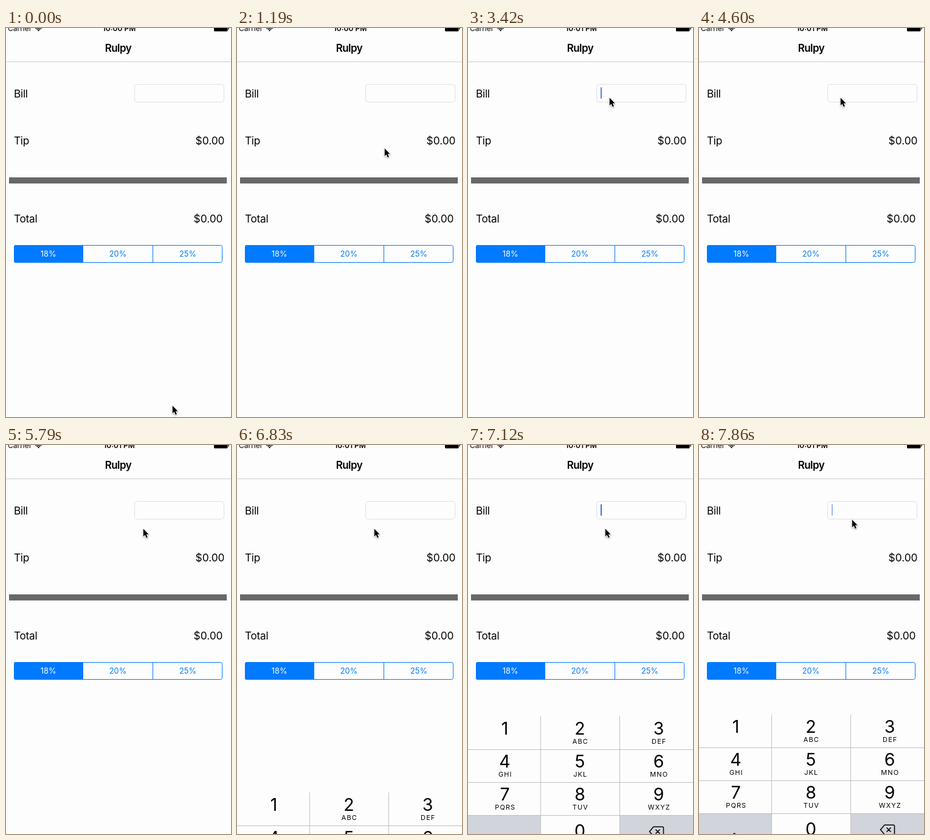
Write an HTML page that moves like this. It is 370x638 px and loops after 8 s.

```html
<!DOCTYPE html>
<html lang="en">
<head>
<meta charset="utf-8">
<title>Tip calculator</title>
<style>
  html, body { margin: 0; width: 100%; height: 100%; overflow: hidden; background: #fdfdfd; }
  svg { display: block; width: 370px; height: 638px; }
  text { font: 17.3px Inter, Roboto, sans-serif; }
  .mid { text-anchor: middle; }
  .label { letter-spacing: -.3px; }
  .amount { text-anchor: end; }
  .title { font-size: 17px; font-weight: 600; letter-spacing: -.5px; }
  .status { font-size: 12px; }
  .clock { font-weight: 600; }
  .seg { font-size: 12.8px; fill: #007aff; }
  .digit { font-size: 28.5px; }
  .letters { font-size: 11px; letter-spacing: 1.1px; }
  .grid { stroke: #c0c0c0; }
  .line { fill: none; stroke: #000; stroke-width: 1.5; }
</style>
</head>
<body>
<svg viewBox="0 0 370 638">
  <rect width="370" height="638" fill="#fdfdfd"/>

  <text class="status" x="3" y="5">Carrier</text>
  <path d="M48.5 1Q53.5 -3 58.5 1M50.5 2.5Q53.5 .2 56.5 2.5" class="line"/>
  <path d="M51.6 3.6Q53.5 2.3 55.4 3.6L53.5 5.6z"/>
  <text id="clock" class="status clock mid" x="186" y="5"></text>
  <rect x="342" y="-5" width="22.5" height="10.6" rx="1.5"/>
  <path d="M365.3 -1q1.5 .3 1.5 2t-1.5 2z"/>

  <text class="title mid" x="184.5" y="39">Rulpy</text>
  <path d="M0 55.5H370" stroke="#cfcfcf"/>

  <text class="label" x="13" y="114">Bill</text>
  <rect x="211.5" y="92.5" width="147" height="29" rx="4" fill="none" stroke="#e0e0e0"/>
  <rect id="caret" x="218" y="97" width="2" height="19" rx="1" fill="#426bf2"/>
  <text class="label" x="13" y="191">Tip</text>
  <text class="amount" x="359.5" y="191">$0.00</text>
  <rect x="5" y="245" width="358" height="10" fill="#686868"/>
  <text class="label" x="13" y="319">Total</text>
  <text class="amount" x="356.5" y="319">$0.00</text>

  <path d="M127 356H16a3 3 0 0 0 -3 3V382a3 3 0 0 0 3 3H127z" fill="#007aff"/>
  <rect x="13.5" y="356.5" width="342" height="28" rx="3" fill="none" stroke="#007aff"/>
  <path d="M241.5 356V385" stroke="#007aff"/>
  <text class="seg mid" x="69.7" y="375" style="fill:#fff">18%</text>
  <text class="seg mid" x="184" y="375">20%</text>
  <text class="seg mid" x="299" y="375">25%</text>

  <g id="pad">
    <rect width="370" height="216" fill="#fdfdfd"/>
    <path d="M0 162H119V216H0zM250 162H370V216H250z" fill="#d1d4db"/>
    <path class="grid" d="M0 54.5H370M0 108.5H370M0 162.5H370M119.5 0V216M249.5 0V216"/>
    <g id="keys"></g>
    <path class="line" d="M298.5 189L305 181.3H319.5Q321.5 181.3 321.5 183.3V194.7Q321.5 196.7 319.5 196.7H305zM308.5 185.5l7 7m0 -7l-7 7"/>
  </g>

  <path id="cursor" d="M0 0V12.6L2.8 10L5 14.8L7.1 13.8L5 9.1H8.8z" stroke="#fff" stroke-width="1.8"
    stroke-linejoin="round" paint-order="stroke" style="filter:drop-shadow(0 1px 1px #0005)"/>
</svg>
<script>
const $ = id => document.getElementById(id);
const LOOP = 8000, STEP = LOOP / 54;

const letters = ['', 'ABC', 'DEF', 'GHI', 'JKL', 'MNO', 'PQRS', 'TUV', 'WXYZ'];
const label = (kind, x, y, s) => `<text class="${kind} mid" x="${x}" y="${y}">${s}</text>`;
$('keys').innerHTML = letters.map((s, i) => {
  const x = [60.5, 184, 313.5][i % 3], y = 54 * Math.floor(i / 3);
  return label('digit', x, y + 30, i + 1) + label('letters', x + .8, y + 45, s);
}).join('') + label('digit', 184, 198, 0) + label('digit', 58, 198, '.');

// Pointer moves: first step, last step, end point.
const home = [273, 619];
const moves = [
  [3, 7, 201, 262], [7, 8, 242, 197], [8, 11, 258, 109],
  [11, 13, 228, 137], [13, 15, 232, 114], [37, 39, 225, 137], [48, 53, 251, 122]
];
const clamp = v => Math.min(1, Math.max(0, v));

function pointerAt(n) {
  return moves.reduce(([x, y], [from, to, toX, toY]) => {
    const p = clamp((n - from) / (to - from));
    return [x + (toX - x) * p, y + (toY - y) * p];
  }, home);
}

// The caret blinks softly once the field has focus.
const FOCUS = 20, BLINK = 6.6;
const caretAt = n => n < FOCUS ? 0 : clamp(.5 + 1.4 * Math.sin((n - FOCUS) / BLINK * 2 * Math.PI));

// The keypad slides up and settles.
const padAt = n => Math.round(442 + 216 * Math.exp(-.523 * Math.max(0, n - 45) ** 1.9));

function draw(now) {
  const n = Math.floor((now % LOOP + 10) / STEP) % 54;
  const [x, y] = pointerAt(n);
  $('cursor').setAttribute('transform', `translate(${x + .8} ${y + .5})`);
  $('caret').setAttribute('opacity', caretAt(n));
  $('pad').setAttribute('transform', `translate(0 ${padAt(n)})`);
  $('clock').textContent = n < FOCUS ? '10:00 PM' : '10:01 PM';
}

const start = performance.now();
function tick() {
  draw(performance.now() - start);
  requestAnimationFrame(tick);
}
tick();
</script>
</body>
</html>
```
